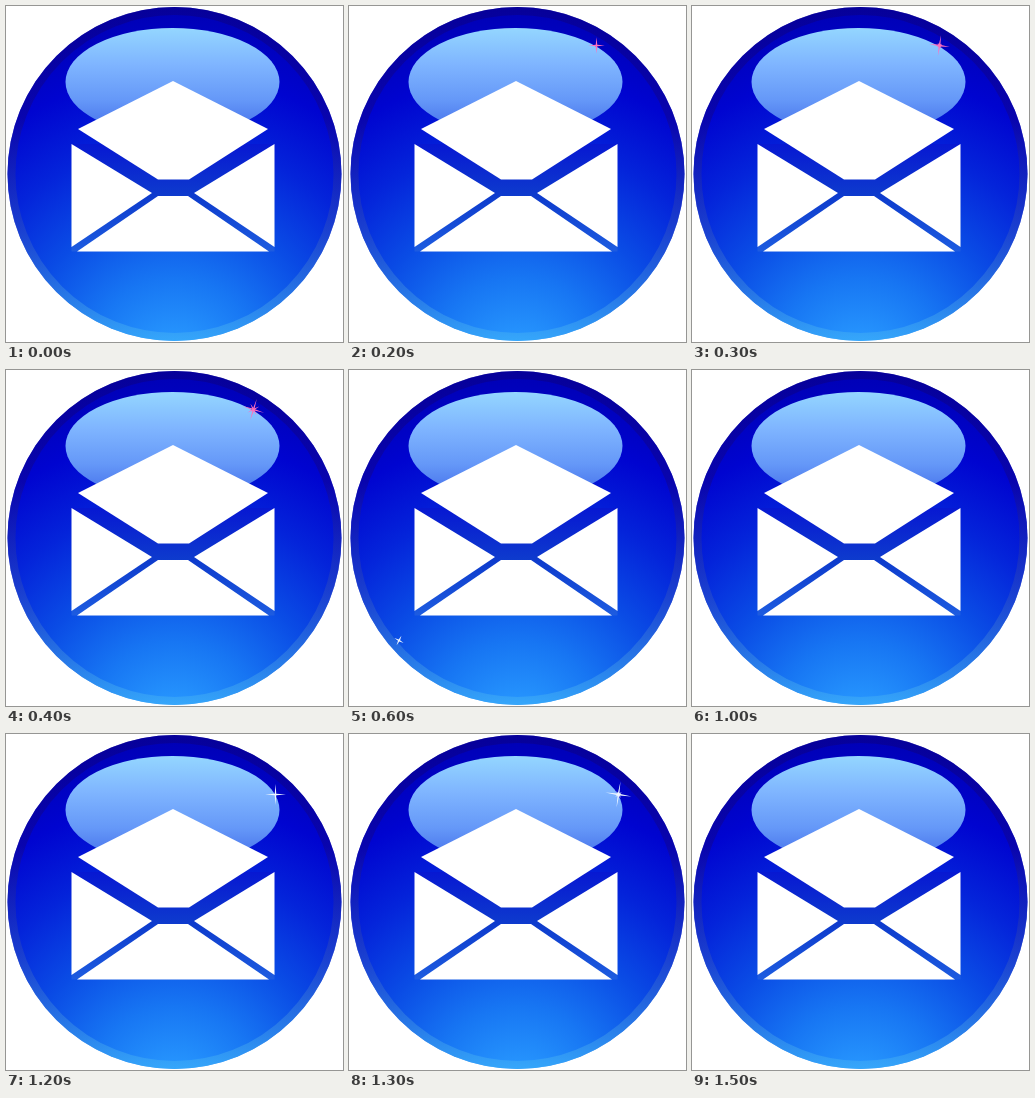
These frames come from a looping animation (337x336 px, 1.6 s). An HTML page with a canvas:

```html
<!DOCTYPE html>
<html>
<head>
<meta charset="utf-8">
<style>
html, body { margin: 0; width: 100%; height: 100%; overflow: hidden; background: #fff; }
canvas { display: block; }
</style>
</head>
<body>
<canvas id="stage" width="337" height="336"></canvas>
<script>
const ctx = document.getElementById('stage').getContext('2d');
const STEP = 100, STEPS = 16;
const LIFE = 4, CYCLE = LIFE + 1; // each sparkle shows for four steps, then one pause
const CENTER = { x: 168.5, y: 168, radius: 167 };

const sparkles = [
  { x: 247.5, y: 39.5, size: 11, tilt: 0, color: '#ff6fbc' },
  { x: 50, y: 270.5, size: 12, tilt: 0.63, color: '#eef6ff' },
  { x: 269.5, y: 60.5, size: 14, tilt: 0, color: '#eef6ff' }
];

function spread(gradient, ...colors) {
  colors.forEach((color, i) => gradient.addColorStop(i / (colors.length - 1), color));
  return gradient;
}

const vertical = (top, bottom, ...colors) =>
  spread(ctx.createLinearGradient(0, top, 0, bottom), ...colors);

function polygon(...points) {
  ctx.beginPath();
  for (const [x, y] of points) ctx.lineTo(x, y);
  ctx.closePath();
  ctx.fill();
}

function drawButton() {
  const { x, y, radius } = CENTER;
  ctx.beginPath();
  ctx.arc(x, y, radius, 0, Math.PI * 2);
  ctx.fillStyle = spread(ctx.createRadialGradient(x, 360, 20, x, 360, 360),
    '#2899ff', '#1776f3', '#0a4ce5', '#0424da', '#0004d0', '#0000b4');
  ctx.fill();

  ctx.beginPath();
  ctx.arc(x, y, radius - 4, 0, Math.PI * 2);
  ctx.lineWidth = 8;
  ctx.strokeStyle = vertical(0, 336,
    'rgba(10,0,135,0.6)', 'rgba(15,5,150,0.6)', 'rgba(40,75,200,0.6)', 'rgba(60,175,250,0.7)');
  ctx.stroke();
}

function drawGloss() {
  ctx.beginPath();
  ctx.ellipse(166.5, 76, 107, 54, 0, 0, Math.PI * 2);
  ctx.fillStyle = vertical(22, 130, '#94d6ff', '#7fb5ff', '#6598f8', '#3f69e8');
  ctx.fill();
}

function drawEnvelope() {
  const left = 65.5, right = 268.5, bottom = 245.5;
  ctx.fillStyle = vertical(138, bottom, '#0718d2', '#0e3ccd', '#1d5ce0');
  polygon([left, 138], [right, 138], [right, bottom], [left, bottom]);

  ctx.fillStyle = '#fff';
  polygon([167, 75], [262, 123], [183, 173.5], [152, 173.5], [72, 123]);
  polygon([left, 138], [146, 187], [left, 241]);
  polygon([right, 138], [188, 187], [right, 241]);
  polygon([71, bottom], [152, 190], [182, 190], [263, bottom]);
}

// Four-pointed star with a narrow waist.
function star(size, angle) {
  const points = Array.from({ length: 8 }, (_, i) => {
    const radius = i % 2 ? 1.1 : size;
    const turn = angle + i * Math.PI / 4;
    return [radius * Math.cos(turn), radius * Math.sin(turn)];
  });
  polygon(...points);
}

function drawSparkle({ x, y, size, tilt, color }, age) {
  const progress = (age + 1) / LIFE;
  const reach = size * (1 - (1 - progress) ** 2);
  const angle = tilt + 0.15 * (age - 1);
  ctx.save();
  ctx.translate(x, y);
  ctx.fillStyle = color;
  star(reach, angle);
  if (progress > 0.5) star(reach * (progress - 0.5) * 1.2, angle + Math.PI / 4);
  ctx.restore();
}

function draw(now) {
  ctx.clearRect(0, 0, 337, 336);
  drawButton();
  ctx.filter = 'blur(0.6px)';
  drawGloss();
  drawEnvelope();
  ctx.filter = 'none';

  const step = Math.floor(now / STEP) % STEPS;
  const age = (step + LIFE) % CYCLE;
  const sparkle = sparkles[Math.floor((step - 1) / CYCLE)];
  if (sparkle && age < LIFE) drawSparkle(sparkle, age);
}

let origin;
function tick(now) {
  origin ??= now;
  draw(now - origin);
  requestAnimationFrame(tick);
}
draw(0);
requestAnimationFrame(tick);
</script>
</body>
</html>
```
